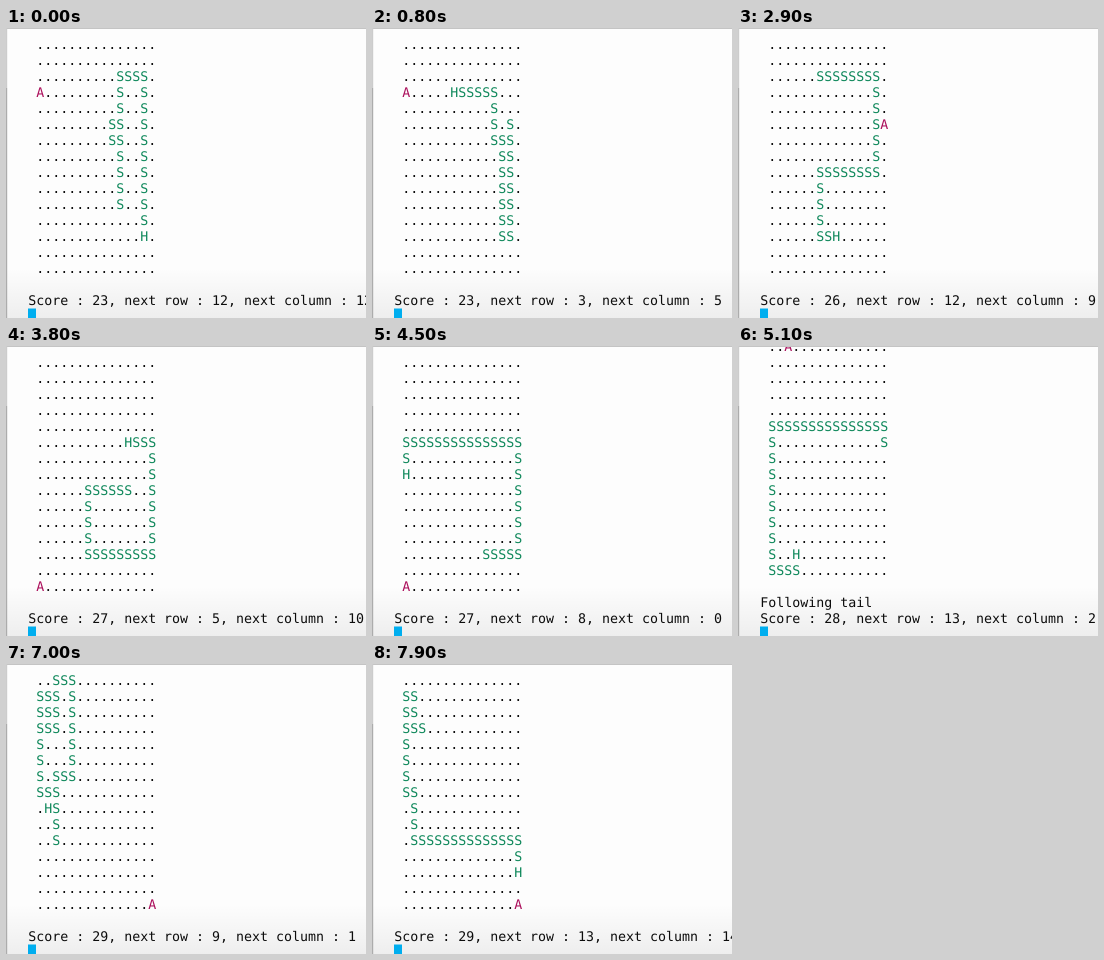
These frames come from a looping animation (360x290 px, 8000 ms). An HTML page:

```html
<!DOCTYPE html>
<html lang="en">
<head>
<meta charset="utf-8">
<title>Snake in a terminal</title>
<style>
  html, body { margin: 0; width: 100%; height: 100%; overflow: hidden; background: #fdfdfd; }
  svg { display: block; width: 360px; height: 290px; }
  text {
    font: 13.29px "DejaVu Sans Mono", "Liberation Mono", monospace;
    fill: #0c0c0c; white-space: pre; text-rendering: geometricPrecision;
  }
  .snake { fill: #0f885b; }
  .apple { fill: #ac105c; }
</style>
</head>
<body>
<svg viewBox="0 0 360 290">
  <defs>
    <linearGradient id="shade" x2="0" y2="1">
      <stop offset="0" stop-opacity="0"/>
      <stop offset="1" stop-opacity=".06"/>
    </linearGradient>
  </defs>
  <rect width="360" height="290" fill="#fdfdfd"/>
  <rect y="240" width="360" height="50" fill="url(#shade)"/>
  <g id="board"></g>
  <text id="note" x="22.2" y="260.8">Following tail</text>
  <text id="status" x="22.2" y="276.8"></text>
  <rect x="22" y="280.5" width="8" height="9.5" fill="#00aeef"/>
  <rect width="360" height="1" fill="#c4c4c4"/>
  <rect width="1.2" height="60" fill="#cccccc"/>
  <rect y="60" width="1.2" height="230" fill="#acacac"/>
</svg>
<script>
const SIZE = 15, LINE = 16, LOOP = 8000, TICK = 100;
const START_LENGTH = 24, START_SCORE = 23;

// Each leg ends at an apple. Turns alternate: a row to reach, then a column, and so on.
const legs = [
  [6, 9, 5, 10, 2, 13, 12, 12, 6, 11, 3, 0],
  [2, 13, 8],
  [6, 12],
  [14, 5],
  [0, 14],
  [3, 13, 1, 12, 2, 6, 4, 0, 2],
  [3, 1, 1, 0, 7, 1, 10, 14, 14]
];

const route = [[10, 10]];
const apples = [];
let axis = 0;
for (const leg of legs) {
  for (const goal of leg) {
    const cell = [...route[route.length - 1]];
    while (cell[axis] !== goal) {
      cell[axis] += Math.sign(goal - cell[axis]);
      route.push([...cell]);
    }
    axis = 1 - axis;
  }
  apples.push({ cell: route[route.length - 1], move: route.length - START_LENGTH });
}

const board = document.getElementById("board");
const note = document.getElementById("note");
const status = document.getElementById("status");

function addText(parent, tag) {
  return parent.appendChild(document.createElementNS("http://www.w3.org/2000/svg", tag));
}

const lines = Array.from({ length: SIZE }, (_, r) => {
  const line = addText(board, "text");
  line.setAttribute("x", 30.2);
  line.setAttribute("y", 20.8 + r * LINE);
  return line;
});

// Two moves per tick, with a regular hitch
function movesAt(tick) {
  return 2 * tick - Math.max(0, Math.floor(0.15 * tick - 0.45));
}

// Flood fill: can the head get to the apple past the body?
function canReachApple(grid, head) {
  const seen = new Set();
  const queue = [head];
  for (const [r, c] of queue) {
    if (grid[r][c] === "A") return true;
    for (const [y, x] of [[r - 1, c], [r + 1, c], [r, c - 1], [r, c + 1]]) {
      const mark = grid[y]?.[x], key = y * SIZE + x;
      if (!mark || mark === "S" || seen.has(key)) continue;
      seen.add(key);
      queue.push([y, x]);
    }
  }
  return false;
}

function fillLine(line, chars) {
  line.textContent = "";
  for (const run of chars.join("").match(/\.+|[HS]+|A/g)) {
    const span = addText(line, "tspan");
    span.textContent = run;
    if (run[0] !== ".") span.setAttribute("class", run === "A" ? "apple" : "snake");
  }
}

function draw(tick) {
  const move = movesAt(tick);
  const eaten = apples.filter(apple => apple.move <= move).length;
  const head = move + START_LENGTH - 1;
  const tail = move - eaten;
  const grid = lines.map(() => Array(SIZE).fill("."));
  const put = ([r, c], mark) => { grid[r][c] = mark; };

  put(apples[eaten].cell, "A");
  route.slice(tail, head).forEach(cell => put(cell, "S"));
  put(route[head], "H");
  lines.forEach((line, r) => fillLine(line, grid[r]));

  const following = !canReachApple(grid, route[head]);
  board.setAttribute("transform", `translate(0 ${following ? -LINE : 0})`);
  note.setAttribute("visibility", following ? "visible" : "hidden");

  const [row, col] = route[head + 1];
  status.textContent = `Score : ${START_SCORE + eaten}, next row : ${row}, next column : ${col}`;
}

const start = performance.now();
let shown = 0;
draw(0);

function loop() {
  const tick = Math.floor((performance.now() - start) % LOOP / TICK);
  if (tick !== shown) draw(shown = tick);
  requestAnimationFrame(loop);
}
requestAnimationFrame(loop);
</script>
</body>
</html>
```
